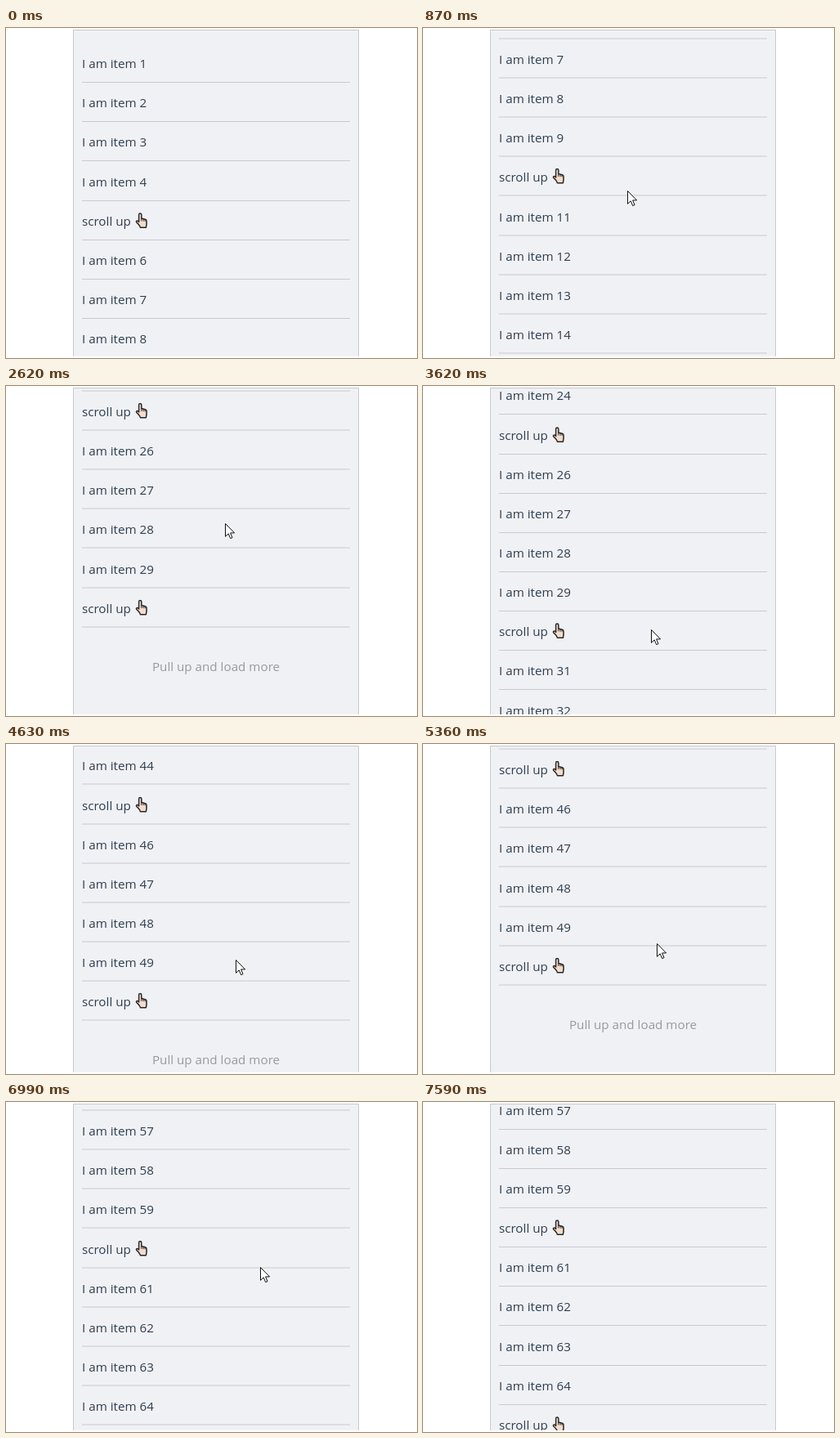
An HTML page for the animation above (7.65 s loop, 503 by 404 pixels).

```html
<!DOCTYPE html>
<html lang="en">
<head>
<meta charset="utf-8">
<title>Pull up to load</title>
<style>
  html, body { margin: 0; width: 100%; height: 100%; overflow: hidden; background: #fff; }
  #stage { position: relative; width: 503px; height: 404px; overflow: hidden; }
  #box {
    position: absolute; left: 82px; top: 2px; width: 348px; height: 399px;
    border: 1px solid #c8c9cc; border-bottom: 0; background: #f0f1f4; overflow: hidden;
    font: 15.2px/48px "Open Sans", "Noto Sans", sans-serif; color: #2c3e50;
  }
  .row, #more { position: absolute; left: 10px; top: 0; width: 328px; height: 47px; white-space: pre; }
  .row { border-bottom: 1px solid #c9cacd; }
  .row svg { position: absolute; left: 65px; top: 14px; }
  #more { text-align: center; color: #999; }
  #cursor { position: absolute; left: -1px; top: -1px; }
</style>
</head>
<body>
<div id="stage">
  <div id="box"><div id="more">Pull up and load more</div></div>
  <svg id="cursor" width="15" height="22" viewBox="-1 -1 15 22">
    <path d="M.5 .5V16.3L4.2 12.8L6.7 18.6L9 17.6L6.6 11.9H11.6Z" fill="#fff" stroke="#111" stroke-width="1"/>
  </svg>
</div>
<script>
const LOOP = 7650, PITCH = 48.16, FIRST_LINE = 66.1, BOX_TOP = 3;
const END_A = 1139.4, END_B = END_A + 20 * PITCH;

const ease = {
  hold: () => 0,
  line: x => x,
  pull: x => x ** 1.6,
  glide: x => 1 - (1 - x) ** 4,
  soft: x => x * x * (3 - 2 * x)
};

// [time, ease towards this step, values...]
const scroll = [
  [0, "hold", 0],
  [580, "hold", 0],
  [800, "pull", 94.7],
  [2000, "glide", 1017.9],
  [2350, "hold", 1017.9],
  [2560, "pull", 1137],
  [2740, "glide", 1176],
  [3300, "soft", END_A],
  [3680, "hold", END_A],
  [3880, "pull", END_A + 128],
  [5060, "glide", END_B],
  [5110, "hold", END_B],
  [5320, "soft", END_B + 30],
  [5690, "soft", END_B],
  [5900, "hold", END_B],
  [6370, "pull", 2270.4],
  [7570, "glide", 2730.45],
  [LOOP, "hold", 2730.45]
];

const pointer = [
  [0, "hold", 264, 412],
  [130, "line", 264, 408],
  [520, "soft", 252, 294],
  [580, "line", 251, 294],
  [800, "pull", 250, 199],
  [870, "line", 250, 199],
  [1100, "soft", 249, 142],
  [1830, "line", 249, 142],
  [2300, "soft", 270, 300],
  [2350, "line", 270, 300],
  [2560, "pull", 268, 181],
  [2740, "glide", 268, 165],
  [3560, "soft", 279, 298],
  [3680, "line", 279, 298],
  [3880, "pull", 277, 170],
  [4250, "line", 277, 168],
  [4630, "line", 281, 263],
  [5000, "glide", 286, 330],
  [5110, "line", 286, 330],
  [5320, "soft", 286, 240],
  [5690, "soft", 292, 350],
  [5900, "line", 292, 350],
  [6370, "pull", 293, 182],
  [6900, "line", 293, 182],
  [7420, "soft", 510, 425],
  [LOOP, "line", 510, 425]
];

function sample(steps, t) {
  const i = Math.max(1, steps.findIndex(s => s[0] >= t));
  const [t0, , ...from] = steps[i - 1];
  const [t1, kind, ...to] = steps[i];
  const x = t >= t1 ? 1 : ease[kind]((t - t0) / (t1 - t0));
  return from.map((v, k) => v + (to[k] - v) * x);
}

const hand = `<svg width="16" height="20" viewBox="0 0 16 20">
  <path d="M4.6 11V2.7a1.6 1.6 0 0 1 3.2 0V7.1L12.4 8.2Q14 8.7 14 10.3V14.4L13.4 18.2H6.4Q5.9 15.6 1.8 12Q.9 10.3 2.5 9.9Q3.8 10 4.6 11.4Z"
    fill="#f5dcc8" stroke="#25272a" stroke-width="1.5" stroke-linejoin="round"/>
  <path d="M7.8 7V10.4M10 7.8V10.6M12.1 8.4V10.8" fill="none" stroke="#25272a"/></svg>`;

const box = document.getElementById("box");
const more = document.getElementById("more");
const cursor = document.getElementById("cursor");
const rows = Array.from({ length: 70 }, (_, i) => {
  const row = document.createElement("div");
  row.className = "row";
  row.innerHTML = (i + 1) % 5 ? `I am item ${i + 1}` : `scroll up ${hand}`;
  box.append(row);
  return row;
});

const moveY = (el, y) => { el.style.transform = `translateY(${y}px)`; };

function draw(t) {
  const [top] = sample(scroll, t);
  const speed = Math.abs(sample(scroll, Math.min(t + 10, LOOP))[0] - top);
  // Rows rest on whole pixels and soften while they move.
  const snap = y => speed > 0.5 ? Math.floor(y) + 0.5 : Math.round(y);
  const lineAt = i => snap(FIRST_LINE + i * PITCH - top) - BOX_TOP;
  const count = t < 3000 ? 30 : t < 5690 ? 50 : 70;

  rows.forEach((row, i) => {
    const y = lineAt(i);
    const shown = i < count && y > -10 && y < 460;
    row.style.display = shown ? "" : "none";
    if (shown) moveY(row, y - 47);
  });
  moveY(more, lineAt(count - 1) + 24);

  const [x, y] = sample(pointer, t).map(Math.round);
  cursor.style.transform = `translate(${x}px, ${y}px)`;
}

const start = performance.now();
function tick() {
  draw((performance.now() - start) % LOOP);
  requestAnimationFrame(tick);
}
tick();
</script>
</body>
</html>
```
